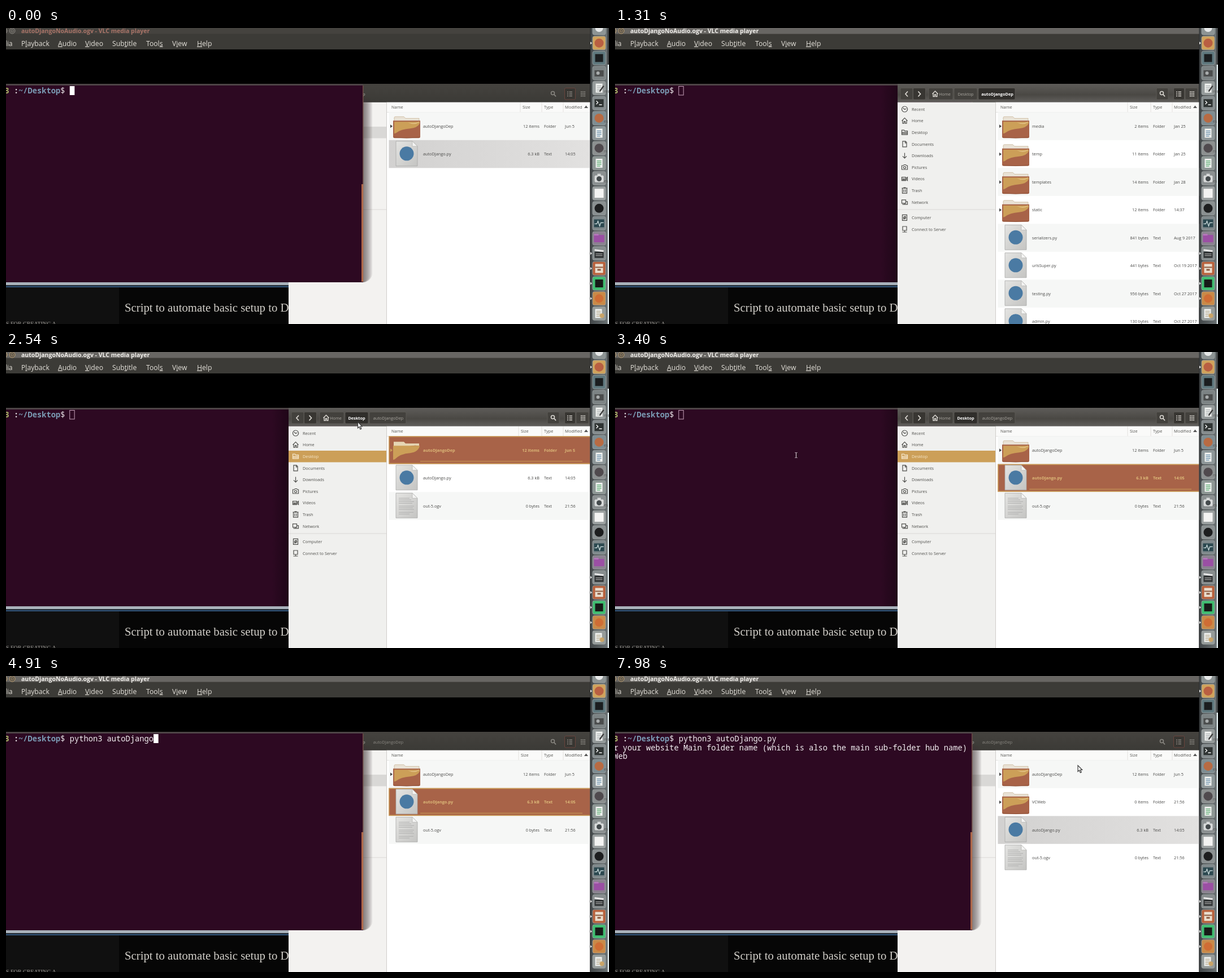
These frames come from a looping animation (1067 by 525 pixels, 8 s). An HTML page:

```html
<!DOCTYPE html>
<html lang="en">
<head>
<meta charset="utf-8">
<title>Desktop recording</title>
<style>
  html, body { margin: 0; width: 100%; height: 100%; overflow: hidden; background: #000; }
  svg { display: block; width: 1067px; height: 525px; }
  text { font-family: "Open Sans", "Noto Sans", sans-serif; white-space: pre; }
  .bold { font-weight: 700; }
  .mono { font-family: "Noto Sans Mono", "DejaVu Sans Mono", monospace; font-size: 13.73px; }
  .serif { font-family: "Liberation Serif", "Noto Serif", serif; }
  .small { font-size: 7.3px; }
</style>
</head>
<body>
<svg id="stage" viewBox="0 0 1067 525" xmlns="http://www.w3.org/2000/svg"></svg>
<script>
const LOOP = 8000;
const PITCH = 8.24, COL0 = -2.6;
const ORANGE = '#a86348', TAN = '#cc9f58';
const stage = document.getElementById('stage');

const rect = (x, y, w, h, fill, extra = '') =>
  `<rect x="${x}" y="${y}" width="${w}" height="${h}" fill="${fill}" ${extra}/>`;
const disc = (x, y, r, fill, extra = '') =>
  `<circle cx="${x}" cy="${y}" r="${r}" fill="${fill}" ${extra}/>`;
const path = (d, fill, extra = '') => `<path d="${d}" fill="${fill}" ${extra}/>`;
const line = (d, color, width = 1, extra = '') =>
  path(d, 'none', `stroke="${color}" stroke-width="${width}" ${extra}`);
const text = (x, y, s, fill, extra = 'class="small"') =>
  `<text x="${x}" y="${y}" fill="${fill}" ${extra}>${s}</text>`;
const at = (x, y, s) => `<g transform="translate(${x} ${y})">${s}</g>`;

// Last entry of a [time, value] list that has begun
const pick = (list, t) => list.reduce((v, e) => (t >= e[0] ? e[1] : v), list[0][1]);

const defs = `<defs>
  <linearGradient id="head" x2="0" y2="1"><stop stop-color="#45433f"/><stop offset="1" stop-color="#3b3a36"/></linearGradient>
  <linearGradient id="headOn" x2="0" y2="1"><stop stop-color="#5e5c59"/><stop offset=".6" stop-color="#4a4844"/><stop offset="1" stop-color="#605e5b"/></linearGradient>
  <linearGradient id="shade" x2="1"><stop stop-color="#000" stop-opacity="0"/><stop offset="1" stop-color="#000" stop-opacity=".3"/></linearGradient>
  <linearGradient id="page" x2="1" y2="1"><stop stop-color="#e4e4e2"/><stop offset="1" stop-color="#c4c4c2"/></linearGradient>
  <linearGradient id="grey" x2="1" y2="0"><stop stop-color="#d2d1d0"/><stop offset="1" stop-color="#e2e1e0"/></linearGradient>
  <linearGradient id="dock" x2="1" y2="0"><stop stop-color="#43484a"/><stop offset="1" stop-color="#6a7173"/></linearGradient>
</defs>`;

/* ---- player window ---- */
const MENU = [[27, 'P_layback'], [92, '_Audio'], [140, '_Video'], [188, 'Sub_title'],
  [248, 'Tool_s'], [294, 'V_iew'], [338, '_Help']];

function player(active) {
  const ink = active ? '#f2f0ec' : '#a97468';
  const ring = active ? '#c8a878' : '#8e8b85';
  let s = rect(0, 0, 1034, 38, '#3c3b37') + rect(0, 0, 1034, 10.5, active ? '#686663' : '#45433f');
  s += disc(11, 5, 5, '#4c4a46', `stroke="${ring}"`) + line('M9 3h4v4h-4z', ring, .8) + disc(-3, 5, 5, '#5a5854', `stroke="${ring}"`);
  s += text(27, 9, 'autoDjangoNoAudio.ogv - VLC media player', ink, 'class="bold" font-size="10.5"');
  s += text(11.5, 31.5, 'Media', '#e4e1da', 'font-size="12.2" text-anchor="end"');
  for (const [x, label] of MENU) {
    const marked = label.replace(/_(.)/, '<tspan text-decoration="underline">$1</tspan>');
    s += text(x, 31.5, marked, '#e4e1da', 'font-size="12.2"');
  }
  return s;
}

/* ---- web page behind ---- */
const webPage = rect(0, 449, 500, 7, '#a9b2bb') + rect(0, 456, 500, 2, '#1d2833') + rect(0, 458, 500, 2, '#33557a') +
  rect(0, 460, 200, 65, '#101010') + rect(200, 460, 300, 65, '#060606') +
  text(210, 503, 'Script to automate basic setup to Dj', '#d3d0ca', 'class="serif" font-size="20.75"') +
  text(0, 528, 'S FOR CREATING A', '#9c9994', 'class="serif" font-size="10"');

/* ---- terminal ---- */
const COMMAND = [[0, 0], [3840, 1], [3880, 2], [4080, 4], [4130, 6], [4670, 7], [4720, 8],
  [4770, 11], [4860, 13], [4910, 18], [5110, 19], [5260, 20], [5310, 22]];
const ANSWER = [[0, 0], [6510, 1], [6810, 2], [7110, 3]];

function terminal(t, front) {
  const mono = (col, row, s, fill, cls = 'mono') =>
    text(COL0 + col * PITCH, 116 + row * 15.7, s, fill, `class="${cls}"`);
  const cursor = (col, row, hollow) => {
    const x = COL0 + col * PITCH, y = 103 + row * 15.7;
    return hollow ? rect(x, y + .5, 8.4, 15.5, 'none', 'stroke="#c9a5bd"')
                  : rect(x, y, 8.6, 16, '#fff');
  };
  let s = '';
  if (front) {
    for (let d = 2; d <= 16; d += 2)
      s += rect(-30, 136 - d, 662 + d, 315 + d, '#3a3533', `rx="${d}" opacity=".1"`);
  }
  s += rect(0, 99, 632, 352, '#2d0922') + rect(0, 99, 632, 3, '#4d4446');
  s += rect(631, 102, 1.5, 175, '#6d4a45') + rect(629, 277, 3.2, 173, '#b0694b');
  s += mono(0, 0, '3', '#a9b868', 'mono bold') + mono(2, 0, ':', '#e6e0e4', 'mono bold') +
       mono(3, 0, '~/Desktop', '#7b9bb4', 'mono bold') + mono(12, 0, '$', '#e6e0e4');
  const typed = pick(COMMAND, t);
  s += mono(14, 0, 'python3 autoDjango.py '.slice(0, typed), '#f3eff2');
  if (t < 5510) s += cursor(14 + typed, 0, t >= 210 && t < 3690);
  if (t >= 5560)
    s += mono(0, 1, 'r your website Main folder name (which is also the main sub-folder hub name)', '#f3eff2');
  const reply = pick(ANSWER, t);
  s += mono(0, 2, 'Web'.slice(0, reply), '#f3eff2');
  if (t >= 6310 && t < 7310) s += cursor(reply, 2);
  return s;
}

/* ---- file manager ---- */
const PLACES = ['Recent', 'Home', 'Desktop', 'Documents', 'Downloads', 'Pictures', 'Videos',
  'Trash', 'Network', 'Computer', 'Connect to Server'];
const HOUSE = 'M-5 0L0-5L5 0M-3.5-1V4.5H-1V1H1V4.5H3.5V-1';
const GLYPHS = ['M0-5A5 5 0 1 0 .1-5M-2.5-2L0 .5L3-1', HOUSE, 'M-5-4H-1L0-2.5H5V4H-5ZM-5 0H5M-5 2H5',
  'M-3.5-5H1.5L3.5-3V5H-3.5ZM1-5V-2H3.5', 'M0-5V4M-3.5 1L0 4.5L3.5 1', 'M-5-3H-2L-1-4.5H2L3-3H5V4H-5ZM0-1.5A2 2 0 1 0 .1-1.5',
  'M-5-3H2V3H-5ZM2 0L5-3V3L2 0M-4 0H1M-4 1.5H1', 'M-4-4H4V5H-4ZM-5-4H5M-1.5-2V3M1.5-2V3M-2-5H2',
  'M-5-4H2V2H-5ZM0 2V4H5V-1H2M-4 4H0', 'M-4-5H4V5H-4ZM-2 3L2-3M0-2A2 2 0 1 0 .1-2', 'M-3.5-5H3.5V2H-3.5ZM0 2V5M-4 5H4'];

const PACKAGE = ['folder', 'autoDjangoDep', '12 items', 'Folder', 'Jun 5'];
const SCRIPT = ['py', 'autoDjango.py', '6.3 kB', 'Text', '14:05'];
const VIDEO = ['doc', 'out-5.ogv', '0 bytes', 'Text', '21:56'];
const CREATED = ['folder', 'VCWeb', '0 items', 'Folder', '21:56'];
const INSIDE = [
  ['folder', 'media', '2 items', 'Folder', 'Jan 25'], ['folder', 'temp', '11 items', 'Folder', 'Jan 25'],
  ['folder', 'templates', '14 items', 'Folder', 'Jan 28'], ['folder', 'static', '12 items', 'Folder', '14:37'],
  ['py', 'serializers.py', '841 bytes', 'Text', 'Aug 9 2017'], ['py', 'urlsSuper.py', '441 bytes', 'Text', 'Oct 19 2017'],
  ['py', 'testing.py', '956 bytes', 'Text', 'Oct 27 2017'], ['py', 'admin.py', '130 bytes', 'Text', 'Oct 27 2017']];

const sheet = path('M690 2H719L728 11V46H690Z', 'url(#page)', 'stroke="#a9a9a7" stroke-width=".8"') +
  path('M719 2V11H728Z', '#f4f4f3', 'stroke="#a9a9a7" stroke-width=".6"');
const ICONS = {
  folder: path('M687 10Q687 8 689 8H704L707 11H731V20H687Z', '#e9e2d6', 'stroke="#c9b797" stroke-width=".8"') +
    path('M685 15H733V43Q733 46 730 46H688Q685 46 685 43Z', ORANGE) +
    path('M687 17H732V20Q728 28 715 29Q699 30 690 37L687 38Z', TAN) +
    path('M711 18Q722 21 731 17V18Q722 24 711 18Z', '#e2c084') +
    line('M685.5 44.5Q709 47 732.5 44.5', '#8f5138'),
  folderOn: path('M686 10H704L707 13H731V17Q720 15 710 19L686 18Z', '#e6d6b4') +
    path('M685 17H732Q730 28 715 30Q698 31 688 41L685 42Z', TAN),
  py: sheet + disc(709, 24, 12.5, '#4a7aa3'),
  doc: sheet + line('M695 11H714M695 14H717M695 17H722M695 20H719M695 25H722M695 28H720M695 31H722M695 36H721M695 39H714', '#b0b0ae')
};

function fileRow(file, i, mark) {
  const [kind, name, size, type, date] = file;
  const on = mark === 'on';
  const ink = on ? '#dcb878' : '#4a4a48';
  const mid = 27.3;
  let s = '';
  if (on) s += rect(677.5, 0, 356, 49.5, ORANGE) + line('M678 .7H1033M678 48.5H1033M678 0V49', TAN, 1.4) + line('M733 44.5H1020', TAN);
  else if (mark) s += rect(677.5, 0, 356, 49.5, 'url(#grey)');
  else if (i % 2 === 0) s += rect(677.5, 0, 356, 49.5, '#f6f7f6');
  if (kind === 'folder') s += path('M680 22L684 25L680 28Z', on ? TAN : '#444');
  s += ICONS[on && kind === 'folder' ? 'folderOn' : kind];
  const cls = on ? 'class="small bold"' : 'class="small"';
  s += text(738, mid, name, ink, cls) + text(944, mid, size, ink, cls + ' text-anchor="end"') +
       text(952, mid, type, ink, cls) + text(989, mid, date, ink, cls);
  return at(0, 149.3 + i * 49.5, s);
}

function header(t, front, inside) {
  const box = (x, w, fill = '#43413d') => rect(x, 106.5, w, 20.5, fill, 'rx="2" stroke="#605e59" stroke-width=".8"');
  const ink = front ? '#dedbd5' : '#8a8882';
  const crumb = (x, label, current) => text(x, 119.5, label, current && front ? '#fff' : front ? '#aaa7a0' : ink,
    `class="small${current ? ' bold' : ''}" text-anchor="middle"`);
  let s = rect(500, 99, 533.5, 32.5, front ? 'url(#headOn)' : 'url(#head)');
  if (front) {
    s += box(505, 22) + box(527.5, 22, '#383632') + box(555, 43) +
      box(600, 41, inside ? '#43413d' : '#302e2b') + box(643, 65, inside ? '#302e2b' : '#43413d') +
      box(958, 21) + box(1009, 22);
    s += line('M518 112.5L514 117L518 121.5M536.5 112.5L540.5 117L536.5 121.5', ink, 1.7);
  }
  s += at(566.5, 117, line(HOUSE, ink, 1.3)) + crumb(583.5, 'Home') + crumb(620.5, 'Desktop', !inside);
  if (t >= 1060) s += crumb(676.5, 'autoDjangoDep', inside);
  s += rect(988.5, 106.5, 19, 20.5, '#383632', `rx="2" stroke="${front ? '#605e59' : '#75483f'}" stroke-width=".8"`);
  s += disc(967.5, 115.5, 3, 'none', `stroke="${ink}" stroke-width="1.5"`) + line('M970 118L973 121.5', ink, 1.8);
  s += line('M993 113.5H995M996.5 113.5H1002M993 117H995M996.5 117H1002M993 120.5H995M996.5 120.5H1002', ink, 1.7);
  s += line('M1017 113.5H1025M1017 117H1025M1017 120.5H1025', ink, 2, 'stroke-dasharray="2 1"');
  return s;
}

function sidebar(front, inside) {
  let s = rect(500, 131.5, 174, 394, front ? '#f0f0ee' : '#f3f2f0') + rect(673, 131.5, 1, 394, '#cfcdca');
  if (!inside) s += rect(500, 175, 173, 20.5, front ? TAN : '#d9d8d6');
  s += rect(500, 321.5, 173, 1, '#dcdad7');
  PLACES.forEach((name, i) => {
    const y = 144 + i * 20.6 + (i > 8 ? 7 : 0);
    const ink = i === 2 && !inside && front ? '#f6e8cc' : '#4e4e4b';
    s += at(512.5, y, line(GLYPHS[i], ink, 1.2)) + text(525, y + 2.8, name, ink);
  });
  return s;
}

function fileManager(t, front) {
  const inside = t >= 1060 && t < 2300;
  const files = inside ? INSIDE : t < 210 ? [PACKAGE, SCRIPT]
    : t < 7410 ? [PACKAGE, SCRIPT, VIDEO] : [PACKAGE, CREATED, SCRIPT, VIDEO];
  const chosen = inside ? null : t >= 800 && t < 2780 ? PACKAGE : SCRIPT;
  const mark = t >= 800 && t < 7410 ? 'on' : 'off';
  const split = t < 210 ? 910 : 907;
  let s = front ? rect(470, 102, 30, 349, 'url(#shade)') : '';
  s += rect(674, 131.5, 359.5, 394, '#fff') + rect(674, 131.5, 359.5, 17.5, '#fafaf9') + rect(674, 149, 359.5, .8, '#dedcda');
  s += line(`M${split} 132V149M948 132V149M986 132V149`, '#dddbd8', .8);
  [[682, 'Name'], [split + 4, 'Size'], [952, 'Type'], [989, 'Modified']].forEach(([x, label]) => {
    s += text(x, 143, label, '#555552', 'font-size="7.4"');
  });
  s += path('M1023 142L1026.5 137.5L1030 142Z', '#555');
  files.forEach((f, i) => { s += fileRow(f, i, f === chosen ? mark : ''); });
  return s + sidebar(front, inside) + header(t, front, inside);
}

/* ---- launcher ---- */
const paper = color => rect(-6, -8, 12, 16, '#eef0ee') + line('M-4-4H4M-4-1H4M-4 2H4M-4 5H2', color, 1.3);
const TILES = [
  ['#8d9494', disc(0, 0, 7, '#e6e8e8')],
  ['#d0a35c', disc(0, 0, 8, '#b95f42')],
  ['#5f787e', rect(-7, -7, 14, 14, '#1b1d1f')],
  ['#7c8384', rect(-8, -5, 16, 11, '#4b4d4d') + disc(-2, 0, 3, '#a8acac')],
  ['#959b9b', paper('#a9aeb0') + line('M8-4L1 6', '#3d3d3d', 2.5)],
  ['#858c8e', rect(-8, -7, 16, 14, '#2f3433') + line('M-5-4L-2-1L-5 2M0 3H5', '#fff', 1.3)],
  ['#7e8d92', disc(0, 0, 8, '#b86b43')],
  ['#8d9799', paper('#5d86a5')],
  ['#8c9090', disc(0, 0, 8, '#504a4e')],
  ['#8d9794', paper('#4fa667')],
  ['#8b9091', rect(-8, -5, 16, 12, '#d8dada', 'rx="2"') + rect(-3, -8, 6, 4, '#d8dada') + disc(0, 1, 4.5, '#444a4c')],
  ['#9ba0a0', rect(-8, -8, 16, 16, '#f3f3f2')],
  ['#8a9091', disc(0, 0, 8, '#1d1e1f')],
  ['#7f898c', rect(-9, -7, 18, 14, '#2c4950') + line('M-8 1H-4L-2-4L1 5L3-1H8', '#d4e4e4', 1.2)],
  ['#8b8190', rect(-9, -6, 18, 13, '#9b4fa4', 'rx="1"') + rect(-9, -8, 8, 3, '#b576bb')],
  ['#878d8e', rect(-8, -3, 16, 11, '#2f3233') + line('M-8-6L8-4', '#e8e8e8', 3) + line('M-6 1H6M-6 4H6', '#c8c8c8')],
  ['#b8603b', rect(-7, -8, 14, 16, '#e9ddcd') + rect(-7, -3, 14, 2, '#8c5a40') + rect(-3, 1, 6, 3, '#8c5a40')],
  ['#3fbd70', rect(-7, -7, 14, 14, '#171a18')],
  ['#c98a48', disc(0, 0, 7.5, '#cf6d35')],
  ['#959b99', at(-1, 0, paper('#b4a88e')) + disc(5, 4, 4, '#c9a468')]];

const launcher = (() => {
  let s = rect(1033.5, 0, 34, 525, '#2b2d2e') + rect(1034.5, 0, 30, 525, 'url(#dock)') +
    rect(1064.5, 0, 2.5, 65, '#3e4142') + rect(1064.5, 65, 2.5, 460, '#dfeaec');
  TILES.forEach(([color, glyph], i) => {
    s += at(1049.5, i * 26.65, rect(-11.5, -12, 23, 24, color, 'rx="3" stroke="#9da4a4" stroke-width=".8"') + glyph);
    if (i === 1 || (i > 14 && i < 19)) s += at(1034, i * 26.65, path('M0-2.5L3 0L0 2.5Z', '#eee'));
  });
  ['ms', 'es', 'm', 'es'].forEach((w, i) => { s += text(1058, 114.5 + i * 53.3, w, '#555', 'font-size="7"'); });
  return s;
})();

/* ---- pointer ---- */
const MOVES = [
  [[370, 900, 525], [780, 745, 178], [1070, 745, 178], [1260, 790, 530]],
  [[1450, 790, 530], [1960, 622, 124], [2560, 622, 124], [2760, 745, 226], [2860, 745, 226], [3380, 320.5, 183], [3860, 320.5, 183]],
  [[7610, 645, 262], [7940, 818.5, 158.5], [8000, 818.5, 158.5]]];

function pointer(t, front) {
  const run = MOVES.find(m => t >= m[0][0] && t < m[m.length - 1][0]);
  if (!run) return '';
  const i = run.findIndex(k => k[0] > t);
  const [t0, x0, y0] = run[i - 1], [t1, x1, y1] = run[i];
  const p = (t - t0) / (t1 - t0), e = p * p * (3 - 2 * p);
  const x = x0 + (x1 - x0) * e, y = y0 + (y1 - y0) * e;
  const overText = x < (front ? 500 : 632) && y < 450;
  return at(x.toFixed(1), y.toFixed(1), overText
    ? line('M-2-4.5H-.7L0-4L.7-4.5H2M0-4V4M-2 4.5H-.7L0 4L.7 4.5H2', '#e2dadf')
    : path('M.5 0V11L3 8.7L4.9 13L6.8 12.2L5 8H8.3Z', '#f4f4f4', 'stroke="#333" stroke-width="1.1"'));
}

let shown = '';
function draw(t) {
  const front = t >= 800 && t < 3460;
  const windows = front ? terminal(t, false) + fileManager(t, true) : fileManager(t, false) + terminal(t, true);
  const scene = defs + rect(0, 0, 1067, 525, '#000') + player(t >= 210) + webPage + windows + launcher + pointer(t, front);
  if (scene !== shown) stage.innerHTML = shown = scene;
}

const start = performance.now();
function tick() {
  draw((performance.now() - start) % LOOP);
  requestAnimationFrame(tick);
}
tick();
</script>
</body>
</html>
```
